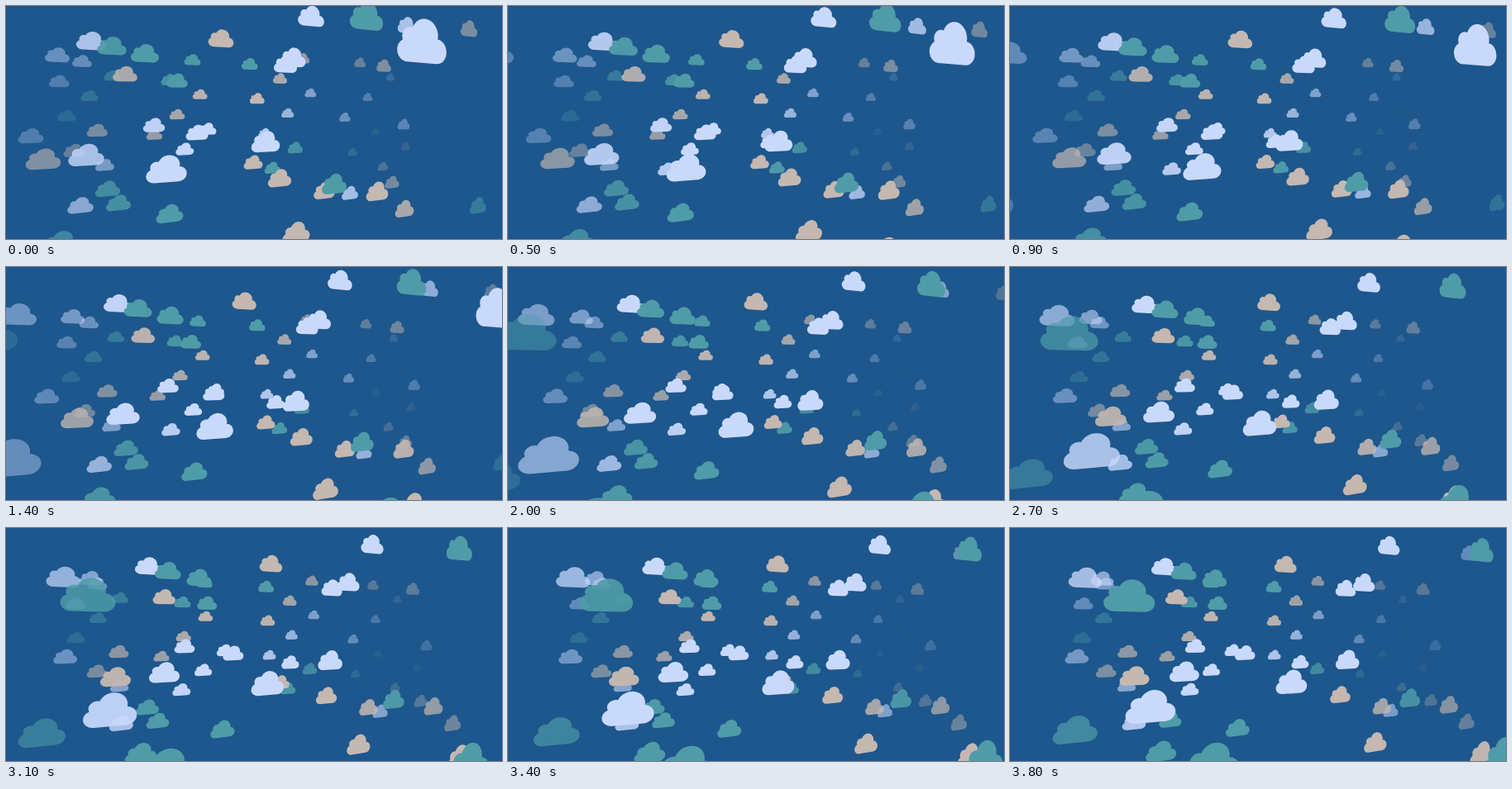
Write an HTML page with a canvas that moves like this. It is 600 px wide and 282 px high and loops after 3.9 s.

```html
<!DOCTYPE html>
<html lang="en">
<head>
<meta charset="utf-8">
<title>Drifting clouds</title>
<style>
  html, body { margin: 0; width: 100%; height: 100%; overflow: hidden; background: #1d578d; }
  canvas { display: block; }
</style>
</head>
<body>
<canvas id="sky" width="600" height="282"></canvas>
<script>
const LOOP = 3900, STEP = 100, SPAN = 3800;
const VX = 1350, VY = 110; // vanishing point of the drift
const SKY = '#1d578d', TAN = '#c4b8b1', TEAL = '#4f9ca8', WHITE = '#c9d9fc';
const ctx = document.getElementById('sky').getContext('2d');
const clouds = [];

// rate: relative gain in depth over SPAN; near clouds recede faster
function addCloud(rate, color, x, y) {
  const tilt = x < 350 ? (350 - x) * 0.005 : (350 - x) * 0.028;
  clouds.push({ rate, color, x, y, size: 0.95 * (11 + 155 * rate + tilt) });
}

function layer(rate, groups) {
  for (const [color, points] of groups) {
    for (const [x, y] of points) addCloud(rate, color, x, y);
  }
}

// Far field: small slow clouds spread evenly by a quasi-random sequence
const frac = v => v % 1;
for (let i = 1; i <= 34; i++) {
  const color = [TAN, WHITE, TEAL][i % 3];
  addCloud(0.003 + 0.025 * frac(i * 0.414), color,
    55 + 470 * frac(i * 0.7549), 50 + 150 * frac(i * 0.5698));
}

// Nearer layers, back to front
layer(0.04, [
  [TAN, [[299, 190]]],
  [TEAL, [[207, 91]]],
  [WHITE, [[62, 60], [30, 158], [179, 145], [311, 165], [481, 144]]]
]);
layer(0.05, [
  [TAN, [[144, 83], [457, 73], [467, 214]]],
  [TEAL, [[123, 222], [136, 239]]],
  [WHITE, [[90, 242], [231, 154], [416, 227]]]
]);
layer(0.072, [
  [TAN, [[260, 40], [331, 209], [385, 224]]],
  [WHITE, [[103, 43], [338, 71]]],
  [TEAL, [[128, 49], [168, 58], [198, 252]]]
]);
layer(0.088, [
  [TAN, [[45, 186], [482, 246]]],
  [WHITE, [[485, 24], [347, 63]]]
]);
layer(0.1, [
  [TAN, [[449, 225], [351, 275], [560, 28]]],
  [TEAL, [[66, 287], [397, 216], [571, 242]]],
  [WHITE, [[369, 13], [-35, 56], [97, 181], [314, 165]]]
]);
layer(0.145, [[WHITE, [[194, 198]]]]);
layer(0.172, [[TAN, [[437, 302]]], [TEAL, [[436, 13], [-140, 268]]]]);
layer(0.244, [[WHITE, [[-118, 243]]], [TEAL, [[-150, 76]]]]);
layer(0.32, [[TEAL, [[-110, 340], [354, 330]]], [WHITE, [[503, 43]]]]);

// Unit cloud centred on the origin
const shape = new Path2D();
for (const [x, y, rx, ry] of [
  [-0.3, 0.24, 0.2, 0.26], [0.3, 0.22, 0.2, 0.28],
  [-0.24, -0.08, 0.16, 0.21], [0.06, -0.13, 0.27, 0.37]
]) {
  shape.moveTo(x + rx, y);
  shape.ellipse(x, y, rx, ry, 0, 0, Math.PI * 2);
}
shape.rect(-0.3, 0, 0.6, 0.5);

// Clouds fade in at the left and out at the right, distant ones first
function opacity(x, near) {
  const left = Math.min(6.8 * near, 0.5) - 0.1 + 0.0042 * x;
  const right = 10 * near + 0.55 - 0.005 * (x - 363);
  return Math.max(0, Math.min(1, left, right));
}

function drawCloud({ rate, color, x: x0, y: y0, size }, t) {
  const depth = 1 + rate * t / SPAN;
  const x = VX - (VX - x0) / depth;
  const y = VY + (y0 - VY) / depth;
  const h = size / depth;
  const w = size / 0.95 / depth * (VX - x) / 800;
  ctx.globalAlpha = opacity(x, rate / depth);
  ctx.fillStyle = color;
  ctx.setTransform(w, w * (y - VY) / (x - VX), 0, h, x, y - 1);
  ctx.fill(shape);
}

function render(t) {
  ctx.setTransform(1, 0, 0, 1, 0, 0);
  ctx.globalAlpha = 1;
  ctx.fillStyle = SKY;
  ctx.fillRect(0, 0, 600, 282);
  for (const c of clouds) drawCloud(c, t);
}

const start = performance.now();
function tick() {
  const t = (performance.now() - start) % LOOP;
  render(Math.floor(t / STEP) * STEP);
  requestAnimationFrame(tick);
}
tick();
</script>
</body>
</html>
```
